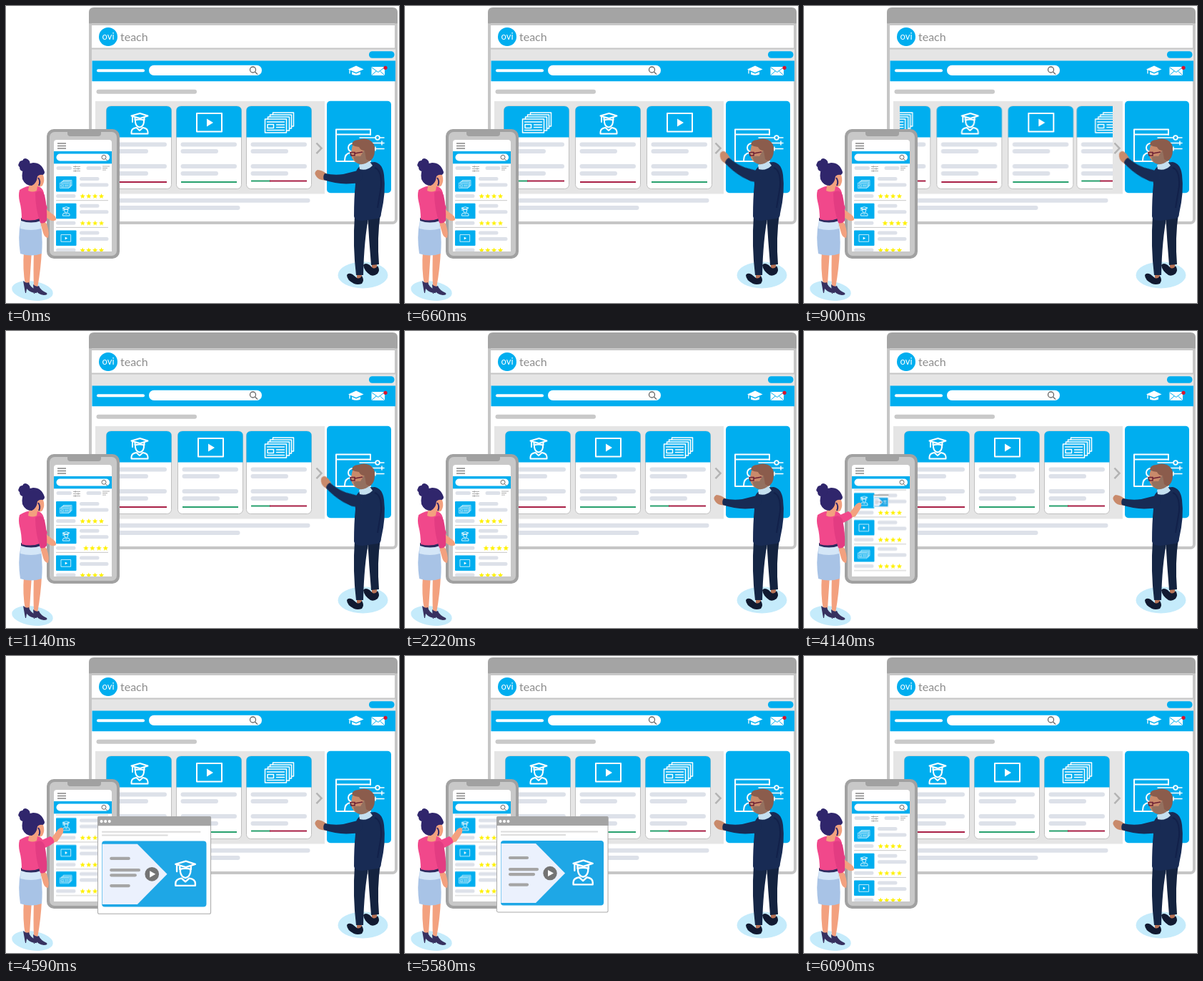
Write an HTML page that moves like this. It is 550x415 px and loops after 6300 ms.

```html
<!DOCTYPE html>
<html lang="en">
<head>
<meta charset="utf-8">
<title>Learning platform</title>
<style>
html, body { margin: 0; width: 100%; height: 100%; overflow: hidden; background: #fff; }
svg { display: block; width: 550px; height: 415px; }
.line { fill: none; stroke: #fff; stroke-width: 2; stroke-linejoin: round; stroke-linecap: round; }
.thin { stroke-width: 1.5; }
.bar { fill: none; stroke: #dde1e9; stroke-width: 6; stroke-linecap: round; }
.small { stroke-width: 5; }
.blue { fill: #00aeef; }
.skin { fill: #f3a17f; }
.navy { fill: #182b54; }

.track, .docs-a, .video-b, .man-arm, .list, .woman-arm, .popup, .pulse use {
  animation: 6300ms linear infinite both;
}
.track { animation-name: slide; }
.docs-a { animation-name: spread; }
.video-b { animation-name: settle; }
.man-arm { animation-name: reach; transform-origin: 492px 237px; }
.list { animation-name: scroll; }
.woman-arm { animation-name: tap; transform-origin: 45px 265px; }
.popup { animation-name: pop; transform-origin: 0 0; }
.pulse use { animation-name: pulse; transform-box: fill-box; transform-origin: center; }

/* Percentages are milliseconds / 63 */
@keyframes slide {
  0%, 1.43% { transform: none; animation-timing-function: ease-in-out; }
  5.71%, 6.19% { transform: translateX(-98px); animation-timing-function: ease-in-out; }
  10.3%, 11.2% { transform: translateX(-196px); animation-timing-function: ease-in-out; }
  17.14%, 100% { transform: translateX(-294px); }
}
@keyframes spread {
  0%, 6.19% { transform: none; }
  10.3%, 100% { transform: translateX(-2px); }
}
@keyframes settle {
  0%, 6.19% { transform: none; }
  10.3%, 18.3% { transform: translateX(2px); }
  20.5%, 100% { transform: none; }
}
@keyframes reach {
  0%, .4% { transform: none; animation-timing-function: ease-in-out; }
  3.8%, 18.2% { transform: rotate(29deg); animation-timing-function: ease-in-out; }
  20.95%, 100% { transform: none; }
}
@keyframes scroll {
  0%, 57.5% { transform: none; animation-timing-function: ease-in-out; }
  63.33%, 91.5% { transform: translateY(-49.5px); animation-timing-function: ease-in-out; }
  96.67%, 100% { transform: none; }
}
@keyframes tap {
  0%, 54.29% { transform: none; animation-timing-function: ease-in-out; }
  60%, 91% { transform: rotate(-90deg); animation-timing-function: ease-in-out; }
  96.67%, 100% { transform: none; }
}
@keyframes pop {
  0%, 64.2% { transform: translate(93px, 229px) scale(0); animation-timing-function: ease-in-out; }
  70.48% { transform: translate(128px, 224px) scale(1.1); animation-timing-function: ease-in-out; }
  73.81%, 88.5% { transform: translate(128px, 224px); animation-timing-function: ease-in-out; }
  90.48% { transform: translate(128px, 224px) scale(1.1); animation-timing-function: ease-in-out; }
  95.24%, 100% { transform: translate(93px, 229px) scale(0); }
}
@keyframes pulse {
  0%, 10.48%, 20.95%, 31.43%, 41.9%, 52.38%, 100% { transform: none; }
  5.24%, 15.71%, 26.19%, 36.67%, 47.14% { transform: scale(1.08); }
}
</style>
</head>
<body>
<svg viewBox="0 0 550 415" xmlns="http://www.w3.org/2000/svg">
<defs>
  <clipPath id="lane"><rect x="134.500" y="134" width="297.500" height="128"/></clipPath>
  <clipPath id="screen"><rect x="67" y="220" width="81" height="123"/></clipPath>

  <!-- Icons, centred on 0,0 -->
  <g id="grad" class="line">
    <path d="M-11-9.500 1-13 12-9.500 1-6ZM-6-7.500v4q6.500-2 13 0v-4M-9.500-9v8"/>
    <path d="M-5.500-3v2.500q1 6 6 7 5-1 6-7V-3"/>
    <path d="M-11 15.500V13q0-5 7-6L.5 11 5 7q7 1 7 6v2.500Z"/>
  </g>
  <g id="video">
    <rect class="line" x="-17.500" y="-13" width="35" height="25.500"/>
    <path d="M-3.500-5.500 5.500 0-3.500 5.500Z" fill="#fff"/>
  </g>
  <g id="docs">
    <path class="line thin" d="M-16-5v-3h30v19h-4M-13-8v-3h30V8h-3M-9-11v-3h29V5h-3"/>
    <rect class="line thin" x="-20" y="-5" width="30" height="19"/>
    <path class="line thin" d="M-17-1h24M-4 3H7M-4 6.500H7M-17 10.500H7"/>
    <rect class="line thin" x="-16.500" y="2.500" width="8.500" height="5"/>
  </g>
  <g id="lens" fill="none" stroke="#666" stroke-width="1.300"><circle r="4"/><path d="m3 3 3.500 3.500"/></g>
  <path id="star" fill="#fff100" d="M0-3.800 1-1.100 3.700-1 1.600.7 2.300 3.400 0 1.800-2.300 3.400-1.600.7-3.700-1-1-1.100Z"/>
  <g id="stars">
    <use href="#star" x="107.200"/><use href="#star" x="115.800"/><use href="#star" x="124.600"/><use href="#star" x="133.500"/>
  </g>

  <!-- Course cards -->
  <g id="card">
    <rect x=".5" y="140" width="91" height="115.500" rx="6" fill="#fff" stroke="#bfbfbf"/>
    <path class="blue" d="M.5 183.500V146.500q0-6.500 6.500-6.500h78q6.500 0 6.500 6.500v37Z"/>
    <path class="bar" d="M9.500 193.500H82M9.500 203H56M9.500 224H82M9.500 234H56"/>
  </g>
  <g id="grad-card" stroke-width="2">
    <use href="#card" stroke-width="1"/><use href="#grad" x="46.500" y="163"/>
    <path d="M7 246h78" stroke="#a81f45"/>
  </g>
  <g id="video-card" stroke-width="2">
    <use href="#card" stroke-width="1"/><use href="#video" x="46.500" y="163"/>
    <path d="M7 246h78" stroke="#27a06d"/>
  </g>
  <g id="docs-card" stroke-width="2">
    <use href="#card" stroke-width="1"/><use href="#docs" x="46.500" y="163"/>
    <path d="M7 244.500h27" stroke="#27a06d"/><path d="M33 244.500h52" stroke="#a81f45"/>
  </g>

  <!-- Phone list rows -->
  <g id="row">
    <rect class="blue" x="70" width="28.500" height="21.500" rx="1"/>
    <path class="bar small" d="M105.500 3.500H128M105.500 12H141M72.500 27.500H95"/>
    <path d="M70 33.700h73" stroke="#c9c9c9"/>
  </g>
  <g id="docs-row"><use href="#row"/><use href="#docs" transform="translate(84 11) scale(.4)"/></g>
  <g id="grad-row"><use href="#row"/><use href="#grad" transform="translate(84 10.500) scale(.42)"/></g>
  <g id="video-row"><use href="#row"/><use href="#video" transform="translate(84 11) scale(.38)"/></g>
</defs>

<!-- Browser window -->
<rect x="118" y="5" width="428" height="298" rx="5" fill="#fff" stroke="#c6c6c6" stroke-width="4"/>
<path d="M116 24.500V9q0-7 7-7h418q7 0 7 7v15.500Z" fill="#a4a4a4"/>
<path d="M116 25.800h432" stroke="#c6c6c6" stroke-width="2.600"/>
<rect x="120" y="59" width="425" height="18" fill="#e5e5e5"/>
<path d="M120 59.500h425" stroke="#c6c6c6" stroke-width="2"/>
<rect class="blue" x="508" y="63.300" width="35.500" height="9.500" rx="4.500"/>
<rect class="blue" x="120.500" y="76.500" width="424.500" height="28.700"/>

<circle class="blue" cx="143" cy="43" r="13"/>
<g font-family="Lato, Inter, sans-serif">
  <text x="143" y="47" font-size="13" text-anchor="middle" fill="#fff">ovi</text>
  <text x="160" y="48.500" font-size="16" fill="#8c8c8c">teach</text>
</g>

<path d="M129 90.300h63" stroke="#fff" stroke-width="4" stroke-linecap="round"/>
<rect x="200" y="82.700" width="158" height="14.300" rx="7" fill="#fff"/>
<use href="#lens" x="345.500" y="89"/>
<path d="M479 88.500 490 83.500 500.500 88.500 490 93ZM484 92v3.400q6 2.600 12 0V92l-6 2.400Z" fill="#fff"/>
<path d="M481 88.500v6" stroke="#fff" stroke-width="1.300"/>
<rect x="511.500" y="85" width="18.500" height="12" rx="1" fill="#fff"/>
<path d="m512 86 8.800 6.500 8.700-6.500M512 96.500l6-5.500M529.500 96.500l-6-5.500" fill="none" stroke="#00aeef"/>
<circle cx="531" cy="86.300" r="2.600" fill="#d8132d"/>

<path d="M129.500 119.800H264" stroke="#c9c9c9" stroke-width="6" stroke-linecap="round"/>
<rect x="125" y="133" width="321" height="129.500" fill="#e5e5e5"/>
<g clip-path="url(#lane)">
  <g class="track">
    <use href="#grad-card" x="140"/>
    <use href="#video-card" x="238"/>
    <g class="docs-a"><use href="#docs-card" x="336"/></g>
    <use href="#grad-card" x="434"/>
    <g class="video-b"><use href="#video-card" x="532"/></g>
    <use href="#docs-card" x="630"/>
  </g>
</g>
<path d="m434.500 191.500 7 7.300-7 7.300" fill="none" stroke="#b3b3b3" stroke-width="2.500"/>
<path class="bar" d="M130 271.700H422.500M130 282H324.500"/>

<rect class="blue" x="449" y="132.700" width="90" height="128.500" rx="5"/>
<g class="line">
  <path d="M510 180v-7.500h-48v44.500h48M462 179.500h48"/>
  <circle cx="485" cy="198" r="6"/>
  <path d="M474 216q0-10 8-11h6q8 1 8 11"/>
  <path class="thin" d="M495 184h34M495 191.500h34M495 199.500h34M526 189v5M517 197v5"/>
</g>
<circle cx="520" cy="184" r="2.800" fill="#00aeef" stroke="#fff" stroke-width="1.800"/>

<!-- Man -->
<ellipse cx="499.500" cy="376" rx="35" ry="18.500" fill="#c5ebfb"/>
<path d="M491 368h7v14h-7ZM512 355h7v14h-7Z" fill="#b87457"/>
<path d="M506 290h18q-5 34-2 71l-11 1q-3-35-5-72Z" fill="#14233f"/>
<path d="M488 292h20q-7 34-8 84h-10q-5-40-2-84Z" fill="#152645"/>
<path d="M477 376q2-4 8-1l6 5q4 2 7-3 4 6 0 11-6 2-11 0-10-5-10-12ZM500 362q3-4 9 0l4 4q4 2 7-3 4 6 0 11-5 4-10 2-9-6-10-14Z" fill="#111a31"/>
<path class="navy" d="M494 225q8-7 22-7 11 2 13 18 3 24-4 54 0 6-5 7l-21 3q-11 0-12-6 0-26 2-45-2-18 5-24Z"/>
<path d="M516 226q10 3 9 26l-5 30" fill="none" stroke="#12214a" stroke-width="2"/>
<path d="m494 222 14-6 5 7q-8 8-18 5Z" fill="#c4e0f0"/>
<path d="M485 195q-3 9-1 17 4 8 11 8l10-4-1-22Z" fill="#c98a6b"/>
<path d="M486 211q6-2 10-1l6-10q5-1 4 6l3 10q-6 6-14 5-7-2-9-10Z" fill="#94705f"/>
<path d="M484 194q1-7 9-7 8-3 15 0 9 4 8 15 0 10-7 15l-5-3-2-12q-6 0-8-5-5 0-10-3Z" fill="#8b5c4c"/>
<path d="M482 204.500h6v4.500h-5ZM488 206l11-2" fill="none" stroke="#6d2134" stroke-width="1.500"/>
<g class="man-arm">
  <path d="M450 235q-8-6-14-6-5 3-3 7 3 6 9 7l7 1Z" fill="#c98a6b"/>
  <path class="navy" d="M446 234q14 3 26 1l20-5q10 3 6 12-5 6-13 6-20 2-40-5-2-5 1-9Z"/>
</g>

<!-- Phone -->
<rect x="57" y="172" width="102" height="181" rx="10" fill="#a1a1a1"/>
<rect x="61" y="176" width="94" height="173" rx="7" fill="#c8c8c8"/>
<path d="M86 175h47v3q0 4-4 4H90q-4 0-4-4Z" fill="#a1a1a1"/>
<path d="M71 187h73q4 0 4 4v152H67V191q0-4 4-4Z" fill="#fff"/>
<path d="M72 192h12M72 195.500h12M72 199h12" stroke="#858585" stroke-width="1.700"/>
<g clip-path="url(#screen)">
  <g class="list">
    <path class="bar small" d="M73 226.500H89.500M115 226.500H131"/>
    <path d="M94 224.500h10M94 227.500h10M94 230.500h10M97 223v3M101 226v3M97 229v3M135 224h10M135 226.500h7M135 229h5" stroke="#a5a5a5" stroke-width=".9"/>
    <use href="#docs-row" y="238"/><use href="#stars" y="265.700"/>
    <use href="#grad-row" y="275.700"/>
    <g class="pulse" transform="translate(0 303.300)">
      <use href="#star" x="107.200"/><use href="#star" x="115.800"/><use href="#star" x="124.600"/><use href="#star" x="133.500"/>
    </g>
    <use href="#video-row" y="313.500"/><use href="#stars" y="341.200"/>
    <use href="#docs-row" y="350.500"/><use href="#stars" y="378.200"/>
  </g>
</g>
<rect class="blue" x="67" y="203" width="81" height="17.300"/>
<rect x="70.500" y="206.500" width="74.500" height="10" rx="5" fill="#fff"/>
<use href="#lens" transform="translate(137 211.300) scale(.75)"/>

<!-- Lesson window -->
<g class="popup">
  <rect x=".5" y=".5" width="155.500" height="133.500" rx="2" fill="#fff" stroke="#a9a9a9"/>
  <path d="M0 13V2q0-2 2-2h152.500q2 0 2 2v11Z" fill="#a4a4a4"/>
  <g fill="#fff"><circle cx="5.500" cy="7" r="2"/><circle cx="11" cy="7" r="2"/><circle cx="16.500" cy="7" r="2"/></g>
  <path d="M6 21.500h136M6 26h91" stroke="#dcdcdc" stroke-width="2"/>
  <rect x="6" y="34" width="144" height="90.500" rx="4" fill="#1ea7e6"/>
  <path d="M6.500 38h48.500l41 41.500L55 121H6.500Z" fill="#ebf1fd"/>
  <path d="M19 58h24M19 74h38M19 81h33M19 95.500h24" stroke="#a5a5a5" stroke-width="4.200" stroke-linecap="round"/>
  <circle cx="75" cy="79.500" r="9.700" fill="#747474"/>
  <path d="m72 75 8 4.500-8 4.500Z" fill="#fff"/>
  <use href="#grad" transform="translate(120.500 77) scale(1.180)"/>
</g>

<!-- Woman -->
<ellipse cx="37" cy="398" rx="29" ry="13.500" fill="#c5ebfb" transform="rotate(8 37 398)"/>
<path class="skin" d="M25 342h11l-3 46-6 1q-4-20-2-47ZM39 342h11q-1 24-6 52l-5-1q-1-24 0-51Z"/>
<path d="M24 384q4 4 8 2 1 7 11 11v4q-9 0-14-6l-1 6h-1ZM38 389q4 4 8 2 2 6 11 10 2 3-4 3-8-1-12-7l-1 5h-1Z" fill="#37315f"/>
<g class="woman-arm">
  <path class="skin" d="M47 281q5-3 9 3l8 6q7 4 6 9-5 3-10-1l-9-6Z"/>
  <path d="M39 262q8-4 12 4l7 16q-3 6-9 5-8-10-10-25Z" fill="#f1488b"/>
</g>
<path class="skin" d="M50 300q7 1 8 8 3 9 1 16-5 0-7-7l-4-14Z"/>
<path d="M21 300h27q4 22 2 46-15 5-30 0-4-26 1-46Z" fill="#a8c3e6"/>
<path d="M21 299q14 5 27 0l1 12q-14 4-29 0Z" fill="#d4e6f7"/>
<path d="M21 296q14 5 27 0l1 4q-14 5-28 0Z" fill="#2b2a5e"/>
<path d="M19 257q10-7 22-6 10 1 12 10 1 19-3 35-14 6-28 2 0-14-3-25-2-9 0-16Z" fill="#f1488b"/>
<path d="M41 261q8-6 13 3 4 18 3 36-4 5-9 3-7-20-7-42Z" fill="#e33c82"/>
<path class="skin" d="M38 237q9-8 14-1 3 8-1 15-4 3-7 1l-1 6q-6 3-12 0l2-11Z"/>
<path d="M23 232q3-12 15-13 12 0 16 13 0 3-3 4-4-1-7 2-1 10-8 13-9 0-13-9-1-5 0-10Z" fill="#30266c"/>
<path d="M18 220q1-4 5-4 2-5 7-2 5 3 3 9 0 8-8 8-6 0-6-6-3-2-1-5Z" fill="#30266c"/>
<path d="M45 240q4 5 1 11" fill="none" stroke="#30266c" stroke-width="2"/>
</svg>
</body>
</html>
```
